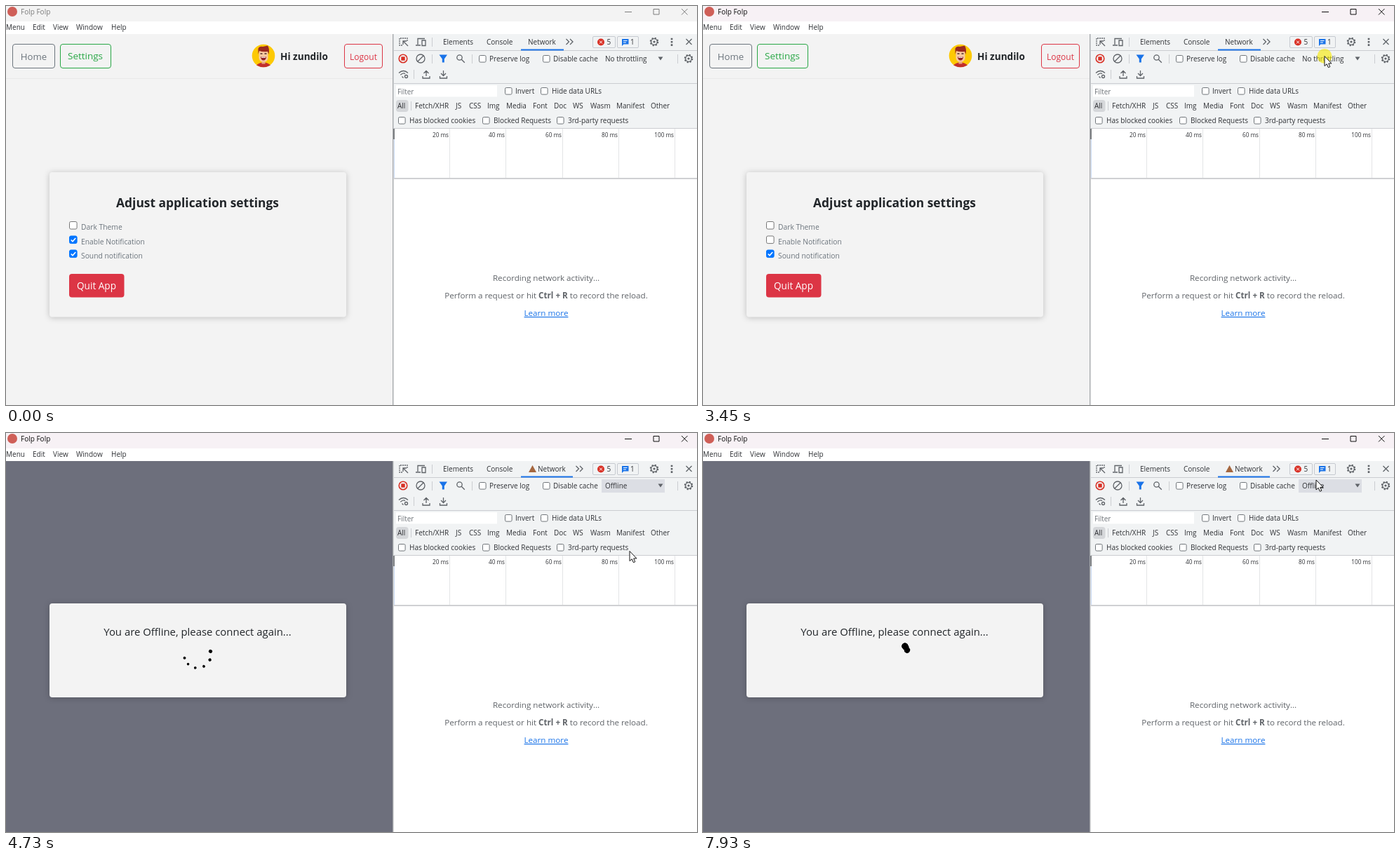
These frames come from a looping animation (985x569 px, 8 s). An HTML page:

```html
<!DOCTYPE html>
<html lang="en">
<head>
<meta charset="utf-8">
<title>Offline settings demo</title>
<style>
  html, body { margin: 0; width: 100%; height: 100%; overflow: hidden; background: #fff; }
  svg { display: block; width: 100vw; height: 100vh; }
  text { font-family: "Open Sans", "Noto Sans", sans-serif; font-size: 10px; fill: #303236; white-space: pre; }
  .mid { text-anchor: middle; }
  .end { text-anchor: end; font-size: 8.2px; }
  .note { text-anchor: middle; font-size: 11.65px; fill: #5f6368; }
  .label { font-size: 10.3px; fill: #6c757d; }
  .bold { font-weight: 700; }
  .title { font-weight: 700; fill: #212529; }
  .line { fill: none; stroke: #5f6368; stroke-width: 1.3; }
  .rule { stroke: #cbcdd1; fill: none; }
  .badge { fill: #f1f3f4; stroke: #c6cad0; }
  #card, #offlineCard { filter: drop-shadow(0 1px 4px rgba(0,0,0,.22)); }
  #menuShadow { filter: blur(11px); }
  #menu .hot rect { fill: #1e90ff; }
  #menu .hot text { fill: #fff; }
</style>
</head>
<body>
<svg viewBox="0 0 985 569" preserveAspectRatio="none">
  <defs>
    <g id="box"><rect x=".5" y=".5" width="9.6" height="9.6" rx="1.8" fill="#fff" stroke="#70757a"/></g>
    <g id="gear">
      <circle r="5.3" fill="none" stroke="#5f6368" stroke-width="2" stroke-dasharray="2.2 1.963"/>
      <circle r="4.3" class="line"/><circle r="1.6" fill="#5f6368"/>
    </g>
    <g id="more"><path d="M0 -4l4 4l-4 4M5.5 -4l4 4l-4 4" class="line"/></g>
  </defs>

  <!-- window frame -->
  <rect id="bar" width="985" height="22"/>
  <rect y="22" width="985" height="18" fill="#fff"/>
  <circle cx="9" cy="8" r="7" fill="#cf5f58"/>
  <g id="chrome">
    <text id="appName" x="21" y="12">Folp Folp</text>
    <path id="winButtons" d="M882 8.5H892M923 4.5H931V12H923ZM963 4L971.500 12.500M971.500 4L963 12.500" fill="none" stroke-width="1"/>
  </g>
  <text x="0" y="34">Menu</text><text x="38" y="34">Edit</text><text x="67" y="34">View</text>
  <text x="100" y="34">Window</text><text x="150" y="34">Help</text>

  <!-- app -->
  <rect y="40" width="552" height="529" fill="#f3f3f3"/>
  <g id="settings">
    <path d="M0 103.500H551" stroke="#e9e9e9"/>
    <g fill="none">
      <rect x="9.500" y="54.500" width="60" height="34" rx="3.500" stroke="#6c757d"/>
      <rect x="77.500" y="54.500" width="72" height="34" rx="3.500" stroke="#28a745"/>
      <rect x="482.500" y="54.500" width="54" height="34" rx="3.500" stroke="#dc3545"/>
    </g>
    <text class="mid" x="39.500" y="77" style="font-size:13.2px;fill:#6c757d">Home</text>
    <text class="mid" x="113" y="76" style="font-size:13.5px;fill:#28a745">Settings</text>
    <text class="mid" x="509.500" y="77" style="font-size:12px;fill:#dc3545">Logout</text>
    <g id="avatar">
      <circle cx="367" cy="71" r="16.300" fill="#fdc903"/>
      <path d="M357 84.500Q361 80.500 367 80.500Q373 80.500 377 84.500Q367 90 357 84.500Z" fill="#c22f2b"/>
      <rect x="364.500" y="77" width="5" height="5.500" fill="#e8a982"/>
      <rect x="360.500" y="62" width="13" height="17.500" rx="5.500" fill="#f8c9a0"/>
      <path d="M359.500 69V61Q361 57 366 58L373 56.500Q376 61 374.500 69L373 65Q366 66 361 64Z" fill="#9a2a20"/>
      <path d="M362.500 68h3M368.500 68h3" stroke="#4a2b25" stroke-width="1.500"/>
      <path d="M363 72.500h8q-.5 5-4 5t-4-5Z" fill="#8d1f22"/>
      <path d="M364 73.200h6" stroke="#fff" stroke-width="1.200"/>
    </g>
    <text class="title" x="391" y="77" style="font-size:13.6px">Hi zundilo</text>

    <rect id="card" x="62" y="237" width="423" height="206.500" rx="4" fill="#f3f3f3"/>
    <text class="title mid" x="273" y="286.500" style="font-size:17.4px">Adjust application settings</text>
    <text class="label" x="107" y="319">Dark Theme</text>
    <text class="label" x="107" y="339.500">Enable Notification</text>
    <text class="label" x="107" y="360">Sound notification</text>
    <g id="checks"></g>
    <rect x="90" y="382" width="78.500" height="33.500" rx="4" fill="#dc3545"/>
    <text class="mid" x="129" y="404" style="font-size:13.6px;fill:#fff">Quit App</text>
  </g>
  <g id="offline">
    <rect y="40" width="551" height="529" fill="#6d6f7c"/>
    <rect id="offlineCard" x="62" y="243" width="423" height="134" rx="4" fill="#f3f3f3"/>
    <text class="mid" x="273" y="288.500" style="font-size:14.9px;fill:#212529">You are Offline, please connect again...</text>
    <g id="spinner" transform="translate(273 316)"></g>
  </g>

  <!-- developer tools -->
  <rect x="552" y="40" width="433" height="135" fill="#f1f3f4"/>
  <rect x="552" y="175" width="433" height="394" fill="#fff"/>
  <rect x="551" y="40" width="1.400" height="529" fill="#a6a9ac"/>
  <path class="rule" d="M553 63.500H985M553 110.500H985M553 174.500H985M607.500 45V58M607.500 69V82M664.500 69V82M957.500 69V82M581.500 91V104M577.500 136V149"/>

  <path class="line" d="M565 56H561V46H572V50" stroke-dasharray="2 1"/>
  <path class="line" d="M566 50L573 57M566 55V50H571"/>
  <path class="line" d="M587 55V46.500H597M584 56H591M593 49H598V56.500H593Z"/>
  <text x="623" y="55">Elements</text><text x="685" y="55">Console</text>
  <g id="tab">
    <path id="warn" d="M745 56L750.500 46L756 56Z" fill="#a5673f"/>
    <text id="tabName" y="55">Network</text>
    <rect id="underline" x="734" y="61.500" height="2" fill="#1a73e8"/>
    <use id="tabMore" href="#more" y="51"/>
  </g>
  <rect class="badge" x="836.500" y="43.500" width="32" height="16" rx="1.500"/>
  <circle cx="848" cy="51.500" r="5" fill="#d93025"/>
  <path d="M846 49.500l4 4m0-4l-4 4" stroke="#fff"/>
  <text x="856.500" y="55">5</text>
  <rect class="badge" x="871.500" y="43.500" width="30" height="16" rx="1.500"/>
  <path d="M878 47H887.500V54.500H880.500L878 57Z" fill="#1a73e8"/>
  <path d="M880 49.500h5.500m-5.500 2.500h4" stroke="#fff"/>
  <text x="890" y="55">1</text>
  <use href="#gear" x="924" y="51"/>
  <path d="M949 45.700v2.600m0 1.700v2.600m0 1.700v2.600" stroke="#5f6368" stroke-width="2.600"/>
  <path class="line" d="M969.500 47l8 8m0-8l-8 8"/>

  <circle cx="566" cy="75" r="5.800" fill="none" stroke="#d93025" stroke-width="1.600"/>
  <rect x="563.300" y="72.300" width="5.400" height="5.400" fill="#d93025"/>
  <path class="line" d="M586.700 79.300l8.500-8.500"/><circle class="line" cx="591" cy="75" r="6"/>
  <path d="M617.500 69.500H629L624.800 75.500V80.500H621.800V75.500Z" fill="#1a73e8"/>
  <circle class="line" cx="646.500" cy="73.500" r="3.700"/><path class="line" d="M649.300 76.300l4.500 4.500" stroke-width="1.800"/>
  <use href="#box" x="674" y="70"/><text x="689" y="79">Preserve log</text>
  <use href="#box" x="765" y="70"/><text x="780" y="79">Disable cache</text>
  <rect id="selectBg" x="849" y="66" width="90" height="19" fill="#dcdee4"/>
  <text id="selected" x="854" y="79"></text>
  <path d="M929.500 72.500H936.500L933 77.500Z" fill="#5f6368"/>
  <use href="#gear" x="973" y="75"/>

  <path class="line" d="M560 95.500Q566.500 89.500 573 95.500M562.300 98.200Q566.500 94.500 569 96.700M564.500 100.500L566.500 102.500"/>
  <circle class="line" cx="570.500" cy="100.500" r="2"/>
  <path class="line" d="M599 100V93M595.500 96l3.500-3.500l3.500 3.500M594 100V103H604V100M623.500 92V99M620 96l3.500 3.500l3.500-3.500M618.500 100V103H628.500V100"/>

  <rect x="556" y="113" width="144" height="16.500" fill="#fff"/>
  <text x="558" y="126" style="fill:#70757a">Filter</text>
  <use href="#box" x="711" y="116"/><text x="726" y="125">Invert</text>
  <use href="#box" x="762" y="116"/><text x="778" y="125">Hide data URLs</text>
  <rect x="556" y="134" width="17.500" height="17" rx="4" fill="#d5d7da"/>
  <g id="types"></g>
  <use href="#box" x="559" y="158"/><text x="575" y="167">Has blocked cookies</text>
  <use href="#box" x="679" y="158"/><text x="695" y="167">Blocked Requests</text>
  <use href="#box" x="785" y="158"/><text x="801" y="167">3rd-party requests</text>

  <g id="timeline"></g>
  <path d="M553.500 190V245" stroke="#c9daf3"/>
  <path d="M553 175V190" stroke="#7c7f83" stroke-width="2"/>
  <path d="M553 246H985" stroke="#bfc1c4" stroke-width="1.600"/>

  <text class="note" x="770" y="392">Recording network activity…</text>
  <text class="note" x="770" y="417">Perform a request or hit <tspan class="bold">Ctrl + R</tspan> to record the reload.</text>
  <text class="note" x="770" y="442" style="fill:#1a73e8;text-decoration:underline">Learn more</text>

  <g id="menu">
    <rect id="menuShadow" x="849" y="101" width="89.500" height="121" fill="#000" fill-opacity=".32"/>
    <rect x="849" y="85.500" width="89.500" height="121" rx="4" fill="#fff" stroke="#a9abb0" stroke-width=".8"/>
  </g>

  <circle id="glow" r="10.500" fill="#f6e800" fill-opacity=".62"/>
  <path id="cursor" d="M0 0V14L3.200 11.200L5.400 16.200L7.800 15.200L5.700 10.400H10Z" fill="#fff" stroke="#111" stroke-width="1" stroke-linejoin="round"/>
</svg>
<script>
const LOOP = 8000, OFFLINE_AT = 4730;
const $ = id => document.getElementById(id);
const show = (id, on) => { $(id).style.display = on ? '' : 'none'; };
const within = (t, a, b) => t >= a && t < b;
const clamp = v => Math.max(0, Math.min(1, v));
const mix = (a, b, k) => a + (b - a) * k;

// CSS ease-in-out: cubic-bezier(.42, 0, .58, 1)
function ease(x) {
  let lo = 0, hi = 1;
  for (let i = 0; i < 18; i++) {
    const s = (lo + hi) / 2;
    const bx = 3 * s * (1 - s) * (1 - s) * .42 + 3 * s * s * (1 - s) * .58 + s ** 3;
    if (bx < x) lo = s; else hi = s;
  }
  return lo * lo * (3 - 2 * lo);
}

// Static parts built from lists
const types = { All: 558, 'Fetch/XHR': 583, JS: 641, CSS: 660, Img: 686, Media: 713, Font: 751,
  Doc: 781, WS: 808, Wasm: 833, Manifest: 870, Other: 919 };
$('types').innerHTML = Object.entries(types)
  .map(([name, x]) => `<text x="${x}" y="146">${name}</text>`).join('');

$('timeline').innerHTML = [1, 2, 3, 4, 5].map(i => {
  const x = 552.5 + Math.round(i * 80.2);
  return `<path d="M${x} 175V245" stroke="#e3e4e6"/><text class="end" x="${x - 1.5}" y="187">${i * 20} ms</text>`;
}).join('');

const options = ['Disabled', 'No throttling', 'Presets', 'Fast 3G', 'Slow 3G', 'Offline', 'Custom', 'Add...'];
const isHeading = i => i % 2 === 0 && i !== 4;
$('menu').innerHTML += options.map((name, i) => `<g class="option">
  <rect x="849" y="${85.5 + 15 * i}" width="89.5" height="15.5" fill="none"/>
  <text class="${isHeading(i) ? 'bold' : ''}" x="${isHeading(i) ? 855 : 871}" y="${97 + 15 * i}">${name}</text></g>`).join('');
const optionRows = [...document.querySelectorAll('.option')];

function checkbox(y, on, hover) {
  const blue = hover ? '#005cc8' : '#0075ff';
  const [fill, edge] = on ? [blue, blue] : ['#fff', hover ? '#4f4f4f' : '#767676'];
  return `<rect x="90.5" y="${y + .5}" width="10.6" height="10.6" rx="2" fill="${fill}" stroke="${edge}"/>` +
    (on ? `<path d="M92.7 ${y + 6}l2.3 2.300l4.200-4.800" fill="none" stroke="#fff" stroke-width="1.6"/>` : '');
}

// Chasing dots: a turning ring of six dots that each circle and shrink
const SPIN = 36;
$('spinner').innerHTML = '<circle/>'.repeat(6);
const dots = [...$('spinner').children];
function spin(t) {
  const s = Math.max(0, (t - 4698) * .00098);
  dots.forEach((dot, i) => {
    const p = ((s + 1.1 - i * .1) / 2) % 1;
    const angle = s * 144 + 360 * ease(Math.min(1, p / .8));
    const scale = p < .5 ? 1 - .6 * ease(p * 2) : .4 + .6 * ease(p * 2 - 1);
    dot.setAttribute('cx', -SPIN * .375);
    dot.setAttribute('cy', -SPIN * .375);
    dot.setAttribute('r', SPIN * .125 * scale);
    dot.setAttribute('transform', `rotate(${angle})`);
  });
}

// Pointer stops: time, x, y
const stops = [
  [130, 816, 524], [870, 94, 337], [940, 95, 336.5], [2550, 95, 336.5], [3320, 886, 71.5],
  [3840, 886, 71.5], [4260, 889, 168.5], [5150, 889, 168.5], [5620, 897, 71.5], [5890, 897, 71.5],
  [6110, 950, 215], [6330, 929, 355], [6760, 920, 514], [7200, 926, 510], [7780, 888, 48], [7930, 874, 67]
];
function pointer(t) {
  const i = stops.findIndex(s => s[0] > t);
  if (i < 0) return stops[stops.length - 1].slice(1);
  if (i === 0) return stops[0].slice(1);
  const [t0, x0, y0] = stops[i - 1], [t1, x1, y1] = stops[i];
  const k = ease((t - t0) / (t1 - t0));
  return [mix(x0, x1, k), mix(y0, y1, k)];
}

function stepped(t) {
  const [start, step] = t < OFFLINE_AT ? [130, 67.6] : [OFFLINE_AT, 68.05];
  return start + Math.floor((t - start) / step) * step;
}

const clicks = [[1340, 1410], [1890, 1960], [2360, 2430], [3450, 3520], [4590, OFFLINE_AT]];

function render(t) {
  const ts = stepped(t), off = t >= OFFLINE_AT, [x, y] = pointer(ts);

  const active = clamp((ts - 1380) / 220), ink = mix(125, 15, active);
  $('bar').setAttribute('fill', t < 1410 ? '#f3f3f3' : '#f7f1f5');
  $('appName').style.fill = $('winButtons').style.stroke = `rgb(${ink},${ink},${ink})`;

  const notify = t < 1410 || within(t, 1960, 2430);
  $('checks').innerHTML = checkbox(307, false) + checkbox(327.5, notify, within(t, 870, 2690)) + checkbox(347.5, true);

  show('settings', !off);
  show('offline', off);
  if (off) spin(ts);

  show('warn', off);
  $('tabName').setAttribute('x', off ? 758 : 744);
  $('underline').setAttribute('width', off ? 74 : 61);
  $('tabMore').setAttribute('x', off ? 812.5 : 798.5);

  const open = within(t, 3520, OFFLINE_AT);
  show('selectBg', t >= 3520);
  $('selected').textContent = off ? 'Offline' : 'No throttling';
  show('menu', open);
  if (open) {
    const row = Math.floor((y - 86) / 15);
    const hot = row < 0 ? 1 : row;
    optionRows.forEach((el, i) => el.classList.toggle('hot', i === hot && !isHeading(i)));
  }

  show('glow', clicks.some(([a, b]) => within(t, a, b)));
  show('cursor', t >= 130);
  for (const id of ['glow', 'cursor']) $(id).setAttribute('transform', `translate(${x} ${y})`);
}

const begin = performance.now();
function frame() {
  render((performance.now() - begin) % LOOP);
  requestAnimationFrame(frame);
}
frame();
</script>
</body>
</html>
```
